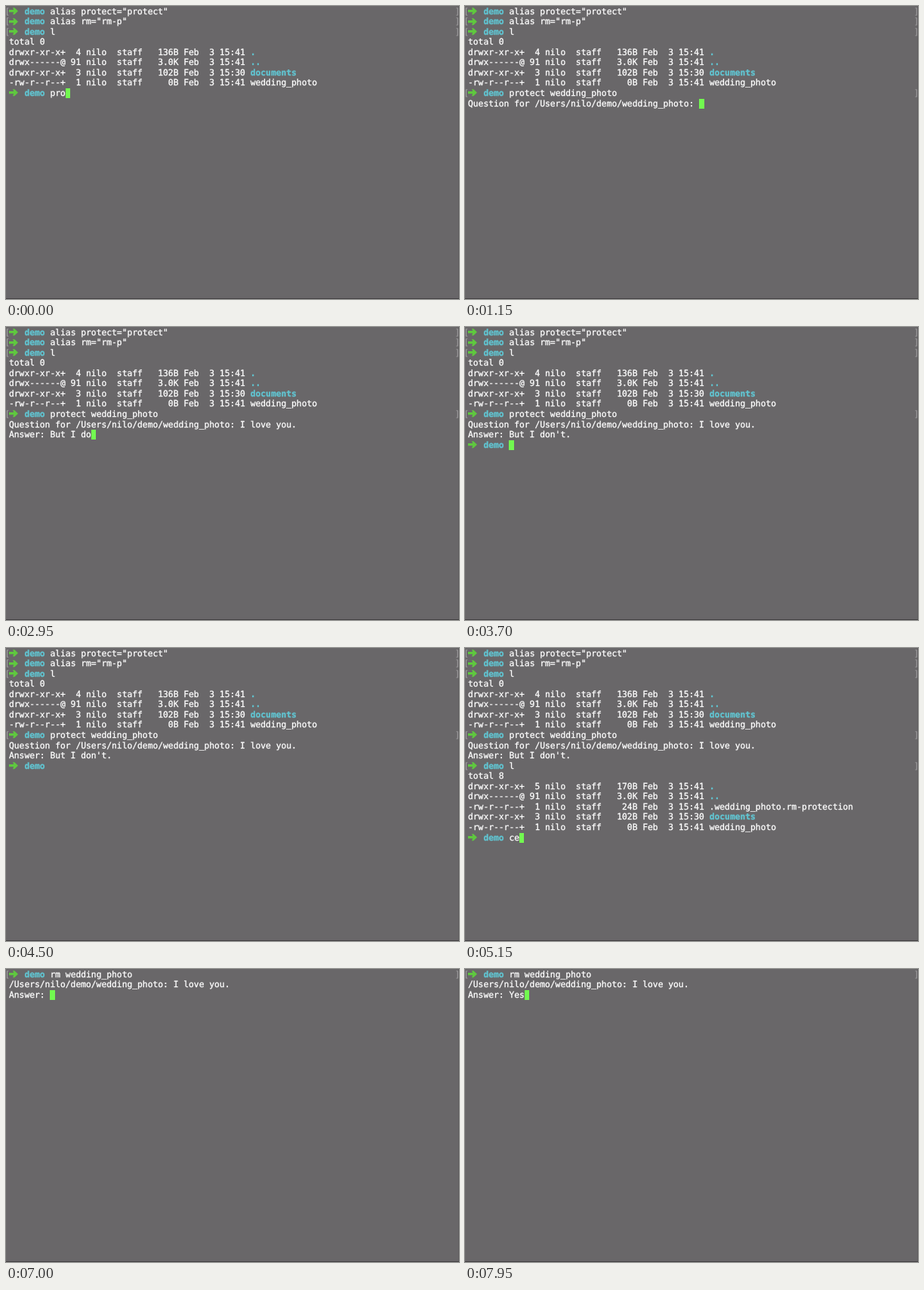
An HTML page for the animation above (8000 ms loop, 600 px wide and 388 px high).

```html
<!DOCTYPE html>
<html lang="en">
<head>
<meta charset="utf-8">
<title>Terminal</title>
<style>
html, body { margin: 0; width: 100%; height: 100%; overflow: hidden; background: #696769; }
#stage { position: relative; width: 600px; height: 388px; overflow: hidden;
  background: #696769; box-shadow: inset 0 -1px #414041, inset -1px 0 #5d5b5d;
  color: #fff; font: 11.3px/13.56px "DejaVu Sans Mono", "Liberation Mono", monospace;
  text-rendering: geometricPrecision; font-variant-ligatures: none; }
.row { position: absolute; left: 0; width: 600px; height: 13.56px; }
.text { position: absolute; left: 4px; top: 0; white-space: pre; -webkit-text-stroke: 0.3px; }
.text b { color: #61c5d2; }
.row svg { position: absolute; left: 4px; top: -0.5px; width: 13px; height: 13px; fill: #5fc83f; }
.mark { position: absolute; top: 0; color: #a5a4a5; }
.open { left: -1.5px; }
.close { left: 594.5px; }
#cursor { position: absolute; width: 6.4px; height: 13px; background: #72f950; }
</style>
</head>
<body>
<div id="stage"><div id="cursor"></div><div id="screen"></div></div>
<script>
const LOOP = 8000, CELL_W = 6.803, CELL_H = 13.56, LEFT = 4, TOP = 0.5;
const USER = "nilo";
const PROMPT = "➜  demo ";
const HIDDEN = [[4200, 4600]];      // cursor blinked off
const screenEl = document.getElementById("screen");
const cursor = document.getElementById("cursor");

const entry = (mode, links, size, time, name) =>
  `${mode} ${String(links).padStart(2)} ${USER}  staff ${size.padStart(6)} Feb  3 ${time} ${name}\n`;

const listing = (total, links, size, extra = "") =>
  `total ${total}\n` +
  entry("drwxr-xr-x+", links, size, "15:41", ".") +
  entry("drwx------@", 91, "3.0K", "15:41", "..") +
  extra +
  entry("drwxr-xr-x+", 3, "102B", "15:30", "documents") +
  entry("-rw-r--r--+", 1, "0B", "15:41", "wedding_photo");

// Each event adds output: \n new line, \b erase, \f clear screen
const events = [];
const print = (time, text) => events.push([time, text]);
const type = (start, step, text) =>
  [...text].forEach((c, i) => print(start + i * step, c));

print(0, `${PROMPT}alias protect="protect"\n${PROMPT}alias rm="rm-p"\n${PROMPT}l\n` +
  listing(0, 4, "136B") + PROMPT + "pro");
type(50, 60, "tect w");
print(500, "edding_photo");
print(700, "\n");
print(850, `Question for /Users/${USER}/demo/wedding_photo: `);
type(1250, 80, "I love you.");
print(2250, "\nAnswer: ");
type(2400, 75, "But I don't.");
print(3500, "\n");
print(3600, PROMPT);
print(4650, "l");
print(4800, "\n" + listing(8, 5, "170B",
  entry("-rw-r--r--+", 1, "24B", "15:41", ".wedding_photo.rm-protection")) + PROMPT);
type(5000, 100, "ce");
type(5250, 65, "\blear");
print(5600, "\f" + PROMPT);
type(5850, 100, "rm ");
print(6200, "w");
print(6350, "edding_photo");
print(6550, "\n");
print(6700, `/Users/${USER}/demo/wedding_photo: I love you.\nAnswer: `);
type(7450, 200, "Yes");

function apply(buffer, text) {
  if (text[0] === "\f") return text.slice(1);
  if (text[0] === "\b") return buffer.slice(0, -1) + text.slice(1);
  return buffer + text;
}

const ARROW = '<svg viewBox="0 0 13 13"><path d="M0 5.1H6.2L5 2.2H7.2L12 6.7 7.2 11.2H5L6.2 8.3H0Z"/></svg>';

function rowHtml(line, i, last) {
  const isPrompt = line.startsWith(PROMPT);
  let body = line, extra = "";
  if (isPrompt) {
    body = "   <b>demo</b> " + line.slice(PROMPT.length);
    extra = ARROW;
    if (i < last) extra += '<span class="mark open">[</span><span class="mark close">]</span>';
  } else {
    body = line.replace(/(:\d\d )(\.\.?|documents)$/, "$1<b>$2</b>");
  }
  return `<div class="row" style="top:${TOP + i * CELL_H}px"><span class="text">${body}</span>${extra}</div>`;
}

let shown = -1;
function draw(now) {
  const t = now % LOOP;
  const count = events.filter(e => e[0] <= t).length;
  if (count !== shown) {
    shown = count;
    const lines = events.slice(0, count).reduce((b, e) => apply(b, e[1]), "").split("\n");
    const last = lines.length - 1;
    screenEl.innerHTML = lines.map((line, i) => rowHtml(line, i, last)).join("");
    cursor.style.left = LEFT + lines[last].length * CELL_W + "px";
    cursor.style.top = TOP + last * CELL_H + "px";
  }
  cursor.style.visibility = HIDDEN.some(([a, b]) => t >= a && t < b) ? "hidden" : "visible";
}

const start = performance.now();
function tick() {
  draw(performance.now() - start);
  requestAnimationFrame(tick);
}
tick();
</script>
</body>
</html>
```
